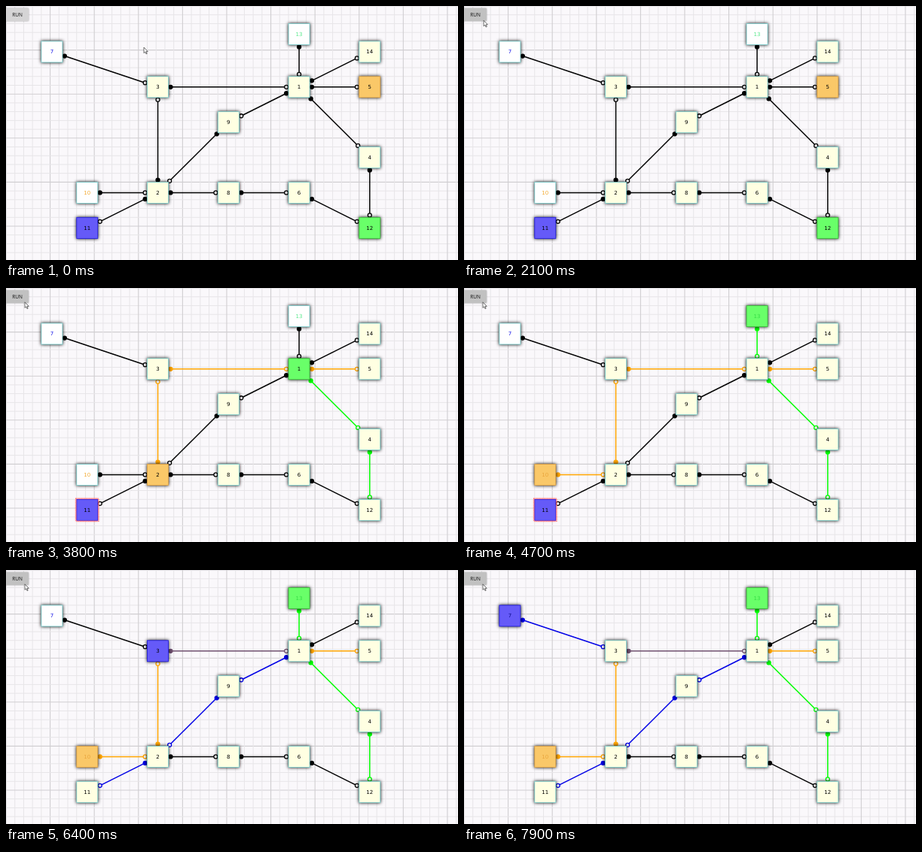
These frames come from a looping animation (600x338 px, 8000 ms). An HTML page:

```html
<!DOCTYPE html>
<html lang="en">
<head>
<meta charset="utf-8">
<title>Graph routing</title>
<style>
html, body { margin: 0; width: 100%; height: 100%; overflow: hidden; background: #faf8fb; }
svg { display: block; width: 600px; height: 338px; }
text { font-family: "DejaVu Sans", sans-serif; font-size: 7px; text-anchor: middle; }
.minor { stroke: #e7e5e8; stroke-width: 1; }
.major { stroke: #d0ced1; stroke-width: 1.1; }
.edge line { stroke: currentColor; stroke-width: 1.5; }
.edge circle { stroke: currentColor; stroke-width: 1.3; }
.box { stroke-width: .8; filter: drop-shadow(0 0 2.2px #000); }
.waiting .box { filter: drop-shadow(0 0 1.8px rgba(255, 70, 70, .9)); }
.halo { fill: none; stroke: #ff7474; stroke-width: 1.5; stroke-dasharray: 1.2 1; visibility: hidden; }
.waiting .halo { visibility: visible; }
#run { filter: drop-shadow(0 .7px 1px rgba(0, 0, 0, .35)); }
#label { font-family: "Open Sans", sans-serif; font-size: 6.5px; fill: #111; }
</style>
</head>
<body>
<svg id="stage" viewBox="0 0 600 338">
  <g id="grid"></g>
  <g id="edges"></g>
  <g id="nodes"></g>
  <rect id="run" x="-1" y="3" width="31" height="17" rx="1"/>
  <text id="label" x="15" y="14.2">RUN</text>
  <path id="cursor" d="M0 0V7.6L1.8 6 3 8.8 4.2 8.3 3 5.6H5.3Z" fill="#fff" stroke="#333" stroke-width=".7"/>
</svg>
<script>
const LOOP = 8000, START = 2800, STEP = 500;
const PITCH = 600 / 51.2, CELL = 4 * PITCH, HALF = 1.2 * PITCH;
const $ = id => document.getElementById(id);

function add(parent, tag, attrs) {
  const el = document.createElementNS("http://www.w3.org/2000/svg", tag);
  for (const key in attrs) el.setAttribute(key, attrs[key]);
  return parent.appendChild(el);
}

// Top left corners of the nodes, in cells of four grid pitches
const places = {
  1: [8, 2], 2: [4, 5], 3: [4, 2], 4: [10, 4], 5: [10, 2], 6: [8, 5], 7: [1, 1],
  8: [6, 5], 9: [6, 3], 10: [2, 5], 11: [2, 6], 12: [10, 6], 13: [8, .5], 14: [10, 1]
};
const centre = id => places[id].map(n => n * CELL + HALF);

// Each link runs from its solid end to its hollow end
const links = [[7, 3], [3, 1], [13, 1], [1, 14], [1, 5], [1, 9], [1, 4], [4, 12],
  [6, 12], [8, 6], [2, 8], [10, 2], [2, 11], [2, 3], [9, 2]];

// The route lists one node per step, starting before the first step
const agents = [
  { line: "#ffa500", fill: "#fac868", rim: "#dca044", ink: "#e9a63e", route: [5, 1, 3, 2, 10] },
  { line: "#00ff00", fill: "#69ff69", rim: "#36b936", ink: "#35dc45", route: [12, 12, 4, 1, 13] },
  { line: "#0000e6", fill: "#655af8", rim: "#1d18e0", ink: "#0c0c8c", route: [11, 11, 11, 11, 11, 2, 9, 1, 3, 7] }
];
const goals = { 10: "#f3ad38", 13: "#55e888", 7: "#1717e6" };
const linkKey = (a, b) => Math.min(a, b) + "-" + Math.max(a, b);

function drawGrid() {
  for (let i = 0; i * PITCH <= 600; i++) {
    const p = i * PITCH;
    const cls = i % 5 ? "minor" : "major";
    add($("grid"), "path", { class: cls, d: `M${p} 0V338` });
    if (p < 338) add($("grid"), "path", { class: cls, d: `M0 ${p}H600` });
  }
}

function port(from, to) {
  const [x, y] = centre(from), [u, v] = centre(to);
  const dx = u - x, dy = v - y, ax = Math.abs(dx), ay = Math.abs(dy);
  const reach = Math.abs(ax - ay) < 1 ? 15.6 : 16.9;
  const k = reach / Math.max(ax, ay);
  return [x + dx * k, y + dy * k];
}

const edgeViews = {};
function drawEdge([a, b]) {
  const g = add($("edges"), "g", { class: "edge" });
  const [x1, y1] = port(a, b), [x2, y2] = port(b, a);
  add(g, "line", { x1, y1, x2, y2 });
  add(g, "circle", { cx: x1, cy: y1, r: 2.5, fill: "currentColor" });
  add(g, "circle", { cx: x2, cy: y2, r: 2.5, fill: "#faf8fb" });
  edgeViews[linkKey(a, b)] = g;
}

const nodeViews = {};
function drawNode(id) {
  const [x, y] = centre(id);
  const g = add($("nodes"), "g", { transform: `translate(${x} ${y})` });
  const box = add(g, "rect", { class: "box", x: -14, y: -14, width: 28, height: 28 });
  add(g, "rect", { class: "halo", x: -15, y: -15, width: 30, height: 30 });
  const text = add(g, "text", { y: 2.5 });
  text.textContent = id;
  nodeViews[id] = { g, box, text };
}

function showStep(step) {
  const tracks = {}, here = {};
  for (const agent of agents) {
    const { route } = agent;
    const last = Math.min(step, route.length - 1);
    here[route[last]] = agent;
    for (let i = 1; i <= last; i++) {
      if (route[i] === route[i - 1]) continue;
      const key = linkKey(route[i - 1], route[i]);
      tracks[key] = tracks[key] ? "#70506f" : agent.line;
    }
  }
  for (const key in edgeViews) edgeViews[key].style.color = tracks[key] || "#000";
  for (const id in nodeViews) {
    const { g, box, text } = nodeViews[id], agent = here[id], goal = goals[id];
    const waiting = agent && step > 0 && !goal && agent.route[0] == id;
    g.setAttribute("class", waiting ? "waiting" : "");
    box.setAttribute("fill", agent ? agent.fill : goal ? "#fff" : "#ffffe2");
    box.setAttribute("stroke", agent ? agent.rim : "#7ad2d2");
    text.setAttribute("fill", goal ? (agent ? agent.ink : goal) : "#000");
  }
}

// Cursor stops: time, x, y
const stops = [[0, 183, 55], [1000, 183, 55], [1200, 169.5, 73], [2150, 25, 18.8], [LOOP, 25, 18.8]];
function cursorAt(t) {
  const i = stops.findIndex(s => s[0] > t);
  const [t0, x0, y0] = stops[i - 1], [t1, x1, y1] = stops[i];
  const p = (t - t0) / (t1 - t0), e = p * p * (3 - 2 * p);
  return [x0 + (x1 - x0) * e, y0 + (y1 - y0) * e];
}

drawGrid();
links.forEach(drawEdge);
Object.keys(places).forEach(drawNode);

let shown = -1;
const origin = performance.now();
function frame() {
  const t = Math.max(0, performance.now() - origin) % LOOP;
  const step = Math.max(0, Math.floor((t - START) / STEP) + 1);
  if (step !== shown) showStep(shown = step);
  const [x, y] = cursorAt(t);
  $("cursor").setAttribute("transform", `translate(${x} ${y})`);
  $("run").setAttribute("fill", x < 30 && y < 20 ? "#c1c1c1" : "#d5d4d5");
  requestAnimationFrame(frame);
}
frame();
</script>
</body>
</html>
```
